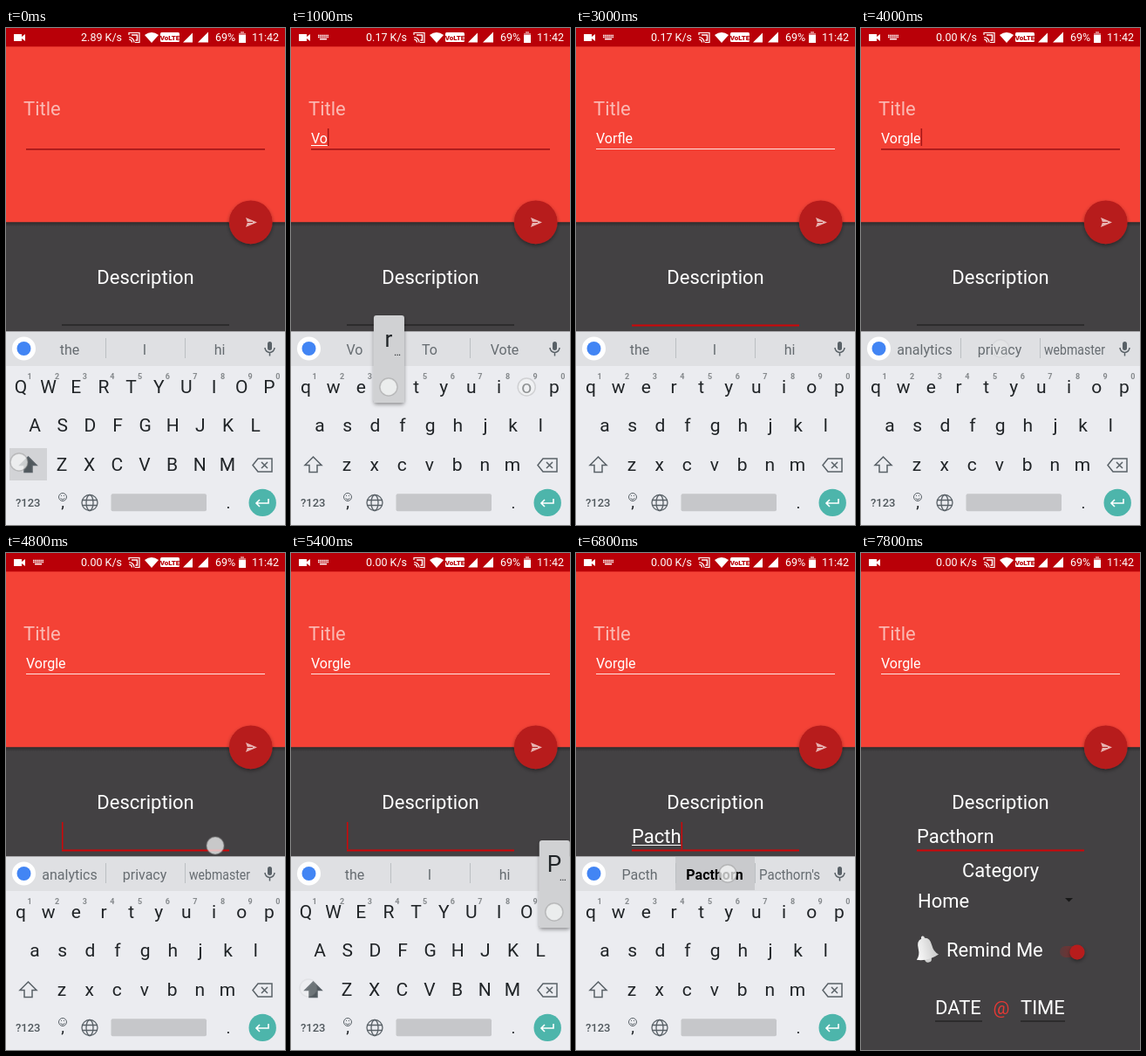
Write an HTML page that moves like this. It is 320 by 569 pixels and loops after 8000 ms.

```html
<!DOCTYPE html>
<html lang="en">
<head>
<meta charset="utf-8">
<title>New reminder</title>
<style>
  html, body { margin: 0; width: 100%; height: 100%; overflow: hidden; background: #434143; }
  svg { display: block; width: 100vw; height: 100vh; font-family: Roboto, sans-serif; }
  .mid { text-anchor: middle; }
  .form { font-size: 22px; fill: #fff; }
  .status { font-size: 12.5px; fill: #fff; }
  .key { font-size: 21px; fill: #202427; }
  .digit { font-size: 9px; font-weight: 700; fill: #85898c; }
  .hint { font-size: 16px; fill: #666c71; }
  .hint.bold { font-weight: 700; fill: #000; }
  .line { fill: none; stroke: #596167; stroke-width: 1.5; }
</style>
</head>
<body>
<svg viewBox="0 0 320 569" preserveAspectRatio="none">
  <defs>
    <filter id="soft" x="-30%" y="-30%" width="160%" height="160%">
      <feDropShadow dx="0" dy="2" stdDeviation="2" flood-opacity=".4"/>
    </filter>
    <linearGradient id="edge" x2="0" y2="1">
      <stop stop-color="#000" stop-opacity=".35"/><stop offset="1" stop-color="#000" stop-opacity="0"/>
    </linearGradient>
    <linearGradient id="bellFill"><stop stop-color="#fff"/><stop offset="1" stop-color="#c9c9c9"/></linearGradient>
    <linearGradient id="trackFill"><stop stop-color="#5a3b3c"/><stop offset="1" stop-color="#8b2928"/></linearGradient>
  </defs>

  <rect width="320" height="569" fill="#434143"/>
  <rect width="320" height="222.300" fill="#f44236"/>
  <rect y="222.300" width="320" height="5" fill="url(#edge)"/>
  <rect width="320" height="21.300" fill="#b90008"/>

  <g fill="#fff">
    <path d="M9 7h9v3l4-3v8l-4-3v3h-9z"/>
    <g id="keyboardIcon" fill="none" stroke="#fff" stroke-width="1.500">
      <path d="M31 8.500h12M31 10.500h12" stroke-dasharray="1.500 .6"/>
      <path d="M33 12.700h8"/>
    </g>
    <g fill="none" stroke="#fff" stroke-width="1.2">
      <path d="M141 8V5.500h12v11h-5M141 10.500a6 6 0 0 1 6 6M141 13a3.500 3.500 0 0 1 3.500 3.500"/>
      <path d="M144 8h6.500v6h-2" stroke-width="1.5"/>
    </g>
    <path d="M159 8q8-6 16 0l-8 9z"/>
    <rect x="177" y="5" width="22" height="11" rx="1.5"/>
    <text x="188" y="13.500" class="mid" font-size="8" font-weight="900" style="fill:#b90008">VoLTE</text>
    <path d="M203 16.500h11v-11zM220 16.500h12v-12z"/>
    <path d="M267 6h2V4h4v2h2v11h-8z"/>
    <path d="M267 6h2V4h4v2h2v2h-8z" fill="#dc7c7f"/>
  </g>
  <text id="net" class="status" x="133" y="15" text-anchor="end"></text>
  <text class="status" x="240" y="15">69%</text>
  <text class="status" x="282" y="15">11:42</text>

  <text class="form" x="20" y="100" style="fill:#fbb9b3">Title</text>
  <rect id="titleLine" x="23" width="274"/>
  <text class="form" id="titleText" x="23" y="132" style="font-size:16px"></text>
  <g filter="url(#soft)"><circle cx="280.700" cy="222.300" r="24.900" fill="#b71c1c"/></g>
  <path d="M275 217l13 5.500-13 5.500 2-5.500z" fill="#e7b3b1"/><path d="M277 222.500h6" stroke="#b71c1c"/>

  <text class="form mid" x="160" y="293">Description</text>
  <rect id="descLine" x="64" width="192"/>
  <text class="form" id="descText" x="64" y="332"></text>
  <rect id="under" height="1" fill="#fff"/>
  <rect id="caret" width="1.5"/>

  <text class="form mid" x="160" y="371">Category</text>
  <text class="form" x="65" y="406">Home</text>
  <path d="M234 395h9l-4.500 4.500z" fill="#181818"/>
  <g transform="translate(74 453) rotate(-14)">
    <circle cy="12" r="4" fill="#d0d0d0"/>
    <path d="M-13 10q5-4 5-12q0-9 6-10q0-3 2-3t2 3q6 1 6 10q0 8 5 12q-13 5-26 0z" fill="url(#bellFill)"/>
  </g>
  <text class="form" x="98" y="462">Remind Me</text>
  <rect x="228" y="450" width="27" height="13" rx="6.500" fill="url(#trackFill)"/>
  <circle cx="248" cy="457" r="8.500" fill="#b71c1c" filter="url(#soft)"/>
  <text class="form" x="85" y="528">DATE</text>
  <text class="form mid" x="161" y="528" style="fill:#e53935;font-size:21px">@</text>
  <text class="form" x="183" y="528">TIME</text>
  <path d="M85 536h54M183 536h51" stroke="#161616"/>

  <g id="keyboard">
    <rect y="347.600" width="320" height="222" fill="#ebecf0"/>
    <rect y="347.600" width="320" height="39.400" fill="#dfe0e3"/>
    <rect id="hintPress" x="114" y="348" width="91" height="38" fill="#c9cacd"/>
    <path d="M114.500 355v23M205.500 355v23" stroke="#bcbfc2"/>
    <circle cx="20.500" cy="367" r="13.500" fill="#fff"/>
    <circle cx="20.500" cy="367" r="8" fill="#4285f4"/>
    <g id="hints"></g>
    <rect x="300" y="359" width="5" height="10" rx="2.500" fill="#596167"/>
    <path class="line" d="M297 366a5.500 5.500 0 0 0 11 0M302.500 372v3.500"/>
    <rect id="shiftPress" x="4" y="481" width="43" height="37" fill="#d2d3d6"/>
    <path id="shift" class="line" d="M25.500 491l9.500 9.500h-5v8h-9v-8h-5z"/>
    <path class="line" d="M289 493h16v15h-16l-6-7.500zM293 497l7 7M300 497l-7 7"/>
    <g id="keys"></g>
    <text x="11" y="548" font-size="13" font-weight="500" fill="#50585d">?123</text>
    <g class="line" style="stroke-width:1">
      <circle cx="65" cy="537" r="4.500"/><path d="M62.500 538.500q2.500 3 5 0M63.500 535v1M66.500 535v1"/>
    </g>
    <text class="key mid" x="65" y="549" style="font-size:19px">,</text>
    <g class="line" style="stroke-width:1.3">
      <circle cx="96" cy="543.500" r="9"/><ellipse cx="96" cy="543.500" rx="4" ry="9"/>
      <path d="M88 540.500h16M88 546.500h16"/>
    </g>
    <rect x="120.500" y="533.300" width="109.500" height="20" rx="2" fill="#c6c7ca"/>
    <text class="key mid" x="255" y="550" style="font-size:19px">.</text>
    <circle id="enter" cx="294.200" cy="543.400" r="15.700"/>
    <path d="M301 539v5h-14M291 540l-4 4 4 4" fill="none" stroke="#fff" stroke-width="1.600"/>
    <g id="popup">
      <rect x="-17" y="-82" width="35" height="100" rx="3" fill="#d0d1d3" filter="url(#soft)"/>
      <text id="popupChar" class="key mid" y="-46" style="font-size:26px"></text>
      <text id="popupMore" class="key mid" x="10" y="-36" style="font-size:12px">…</text>
    </g>
  </g>
  <g id="touches"></g>
</svg>

<script>
const LOOP = 8000, TICK = 200, FADE = 300;
const NAME = 'Vorgle', TYPO = 'Vorfle', NOTE = 'Pacthorn';
const $ = id => document.getElementById(id);
const set = (el, attrs) => { for (const k in attrs) el.setAttribute(k, attrs[k]); };
const show = (el, on) => { el.style.display = on ? '' : 'none'; };
const add = (parent, tag, attrs) => {
  const el = document.createElementNS('http://www.w3.org/2000/svg', tag);
  set(el, attrs);
  return parent.appendChild(el);
};

const rows = [['qwertyuiop', 17, 411], ['asdfghjkl', 33, 455], ['zxcvbnm', 64, 500]];
const keys = {};
for (const [letters, x0, y] of rows) [...letters].forEach((ch, i) => {
  const x = x0 + i * 31.65;
  keys[ch] = { x, y, el: add($('keys'), 'text', { class: 'key mid', x, y: y + 7 }) };
  if (y === 411) add($('keys'), 'text', { class: 'digit mid', x: x + 10, y: 402 }).textContent = (i + 1) % 10;
});
const hintX = [73, 159, 245];
const hints = hintX.map(() => add($('hints'), 'text', { class: 'hint mid' }));

const plain = ['the', 'I', 'hi'];
// Each step changes part of the state from its time onward.
const steps = [
  [-500, { title: '', desc: '', focus: 'title', composing: false, upper: true, hints: plain, bold: false, net: '2.89' }],
  [600, { title: 'V', composing: true, upper: false, hints: ['V', 'Very', 'Via'] }],
  [1000, { title: 'Vo', hints: ['Vo', 'To', 'Vote'], net: '0.17' }],
  [1200, { title: 'Vor', hints: ['Vor', 'For', NAME] }],
  [1600, { title: 'Vorf', hints: ['Vorf', 'Form', NAME], bold: true }],
  [2000, { title: 'Vorfl', hints: ['Vorfl', 'Floral', NAME] }],
  [2200, { title: TYPO, hints: [TYPO, NAME, 'World'] }],
  [2400, { focus: 'desc', composing: false, hints: plain, bold: false }],
  [3400, { focus: 'title', composing: true, hints: [TYPO, NAME, 'World'] }],
  [3800, { title: NAME, composing: false, hints: ['analytics', 'privacy', 'webmaster'], net: '0.00' }],
  [4800, { focus: 'desc' }],
  [5000, { hints: plain }],
  [5200, { upper: true }],
  [5600, { desc: 'P', composing: true, upper: false, hints: ['P', 'Please', 'Put'] }],
  [5800, { desc: 'Pa', hints: ['Pa', 'Pay', 'Part'] }],
  [6000, { desc: 'Pac', hints: ['Pac', NOTE, 'Pack'] }],
  [6400, { desc: 'Pact', hints: ['Pact', NOTE, 'Pacts'] }],
  [6600, { desc: 'Pacth', hints: ['Pacth', NOTE, NOTE + "'s"], bold: true }],
  [7000, { desc: NOTE, composing: false, hints: plain, bold: false }]
];

const press = (from, to, key, dx = 0, dy = 0) =>
  ({ from, to, key, x: keys[key].x + dx, y: keys[key].y + dy });
const tap = (from, to, x, y, on) => ({ from, to, x, y, on });
const touches = [
  tap(0, 200, 15, 497, 'shift'),
  press(400, 600, 'v'), press(800, 1000, 'o'), press(1000, 1200, 'r'),
  press(1400, 1600, 'f', 15, 3), press(1800, 2000, 'l', -5), press(2000, 2200, 'e'),
  tap(2200, 2400, 294, 543, 'enter'),
  tap(3200, 3400, 62, 127),
  tap(3600, 3800, 160, 367, 'hint'),
  tap(4600, 5000, 240, 335),
  tap(5000, 5200, 20, 498, 'shift'),
  press(5400, 5600, 'p'), press(5600, 5900, 'a', -11, -6), press(5900, 6200, 'c', 5, -1),
  press(6200, 6400, 't'), press(6400, 6500, 'h'),
  tap(6800, 7000, 174, 367, 'hint')
];
for (const touch of touches) {
  touch.el = add($('touches'), 'circle', {
    cx: touch.x, cy: touch.y, r: 10, fill: '#f4f5f5', 'fill-opacity': .75,
    stroke: '#888', 'stroke-opacity': .4, 'stroke-width': 1.5
  });
}

function touchAlpha({ from, to }, t) {
  if (t < from) return 0;
  return t < to ? 1 : Math.max(0, .7 * (1 - (t - to) / FADE));
}

function drawField(s, blink) {
  const onTitle = s.focus === 'title';
  $('titleText').textContent = s.title;
  $('descText').textContent = s.desc;
  set($('titleLine'), onTitle
    ? { y: 138, height: 1.7, fill: '#a41618' } : { y: 138, height: 1, fill: '#ffe5e3' });
  set($('descLine'), onTitle
    ? { y: 339.5, height: 1, fill: '#191919' } : { y: 339.5, height: 2, fill: '#cf0609' });
  const text = $(onTitle ? 'titleText' : 'descText');
  const left = onTitle ? 23 : 64;
  const width = text.textContent ? text.getComputedTextLength() : 0;
  set($('under'), { x: left, y: onTitle ? 134 : 334, width: s.composing ? width : 0 });
  set($('caret'), onTitle
    ? { x: left + width, y: 115, height: 20, fill: '#a41618' }
    : { x: left + width, y: 308, height: 31, fill: '#cf0609' });
  show($('caret'), blink);
}

function drawHints(s) {
  hints.forEach((el, i) => {
    el.textContent = s.hints[i];
    el.classList.toggle('bold', s.bold && i === 1);
    const squeeze = Math.min(1, 70 / el.getComputedTextLength());
    set(el, { transform: `translate(${hintX[i]} 374) scale(${squeeze} 1)` });
  });
}

function draw(t) {
  const past = steps.filter(([at]) => at <= t);
  const s = Object.assign({}, ...past.map(step => step[1]));
  const idle = t - past[past.length - 1][0];
  const slide = Math.min(1, Math.max(0, (t - 7300) / 200));

  $('net').textContent = s.net + ' K/s';
  show($('keyboardIcon'), t >= 600 && t < 7400);
  drawField(s, slide === 0 && idle % 1000 < 500);
  drawHints(s);

  for (const ch in keys) keys[ch].el.textContent = s.upper ? ch.toUpperCase() : ch;
  $('shift').style.fill = s.upper ? '#50585d' : 'none';
  set($('keyboard'), { transform: `translate(0 ${slide * 222})` });

  const held = touches.find(p => t >= p.from && t < p.to) || {};
  show($('shiftPress'), held.on === 'shift');
  show($('hintPress'), held.on === 'hint');
  set($('enter'), { fill: held.on === 'enter' ? '#3f978f' : '#4db5ab' });
  show($('popup'), held.key);
  if (held.key) {
    const { x, y } = keys[held.key];
    set($('popup'), { transform: `translate(${x} ${y})` });
    $('popupChar').textContent = s.upper ? held.key.toUpperCase() : held.key;
    show($('popupMore'), held.key !== 'l');
  }
  for (const touch of touches) set(touch.el, { opacity: touchAlpha(touch, t) });
}

const start = performance.now();
function frame() {
  const t = (performance.now() - start) % LOOP;
  draw(Math.floor(t / TICK) * TICK);
  requestAnimationFrame(frame);
}
frame();
</script>
</body>
</html>
```
